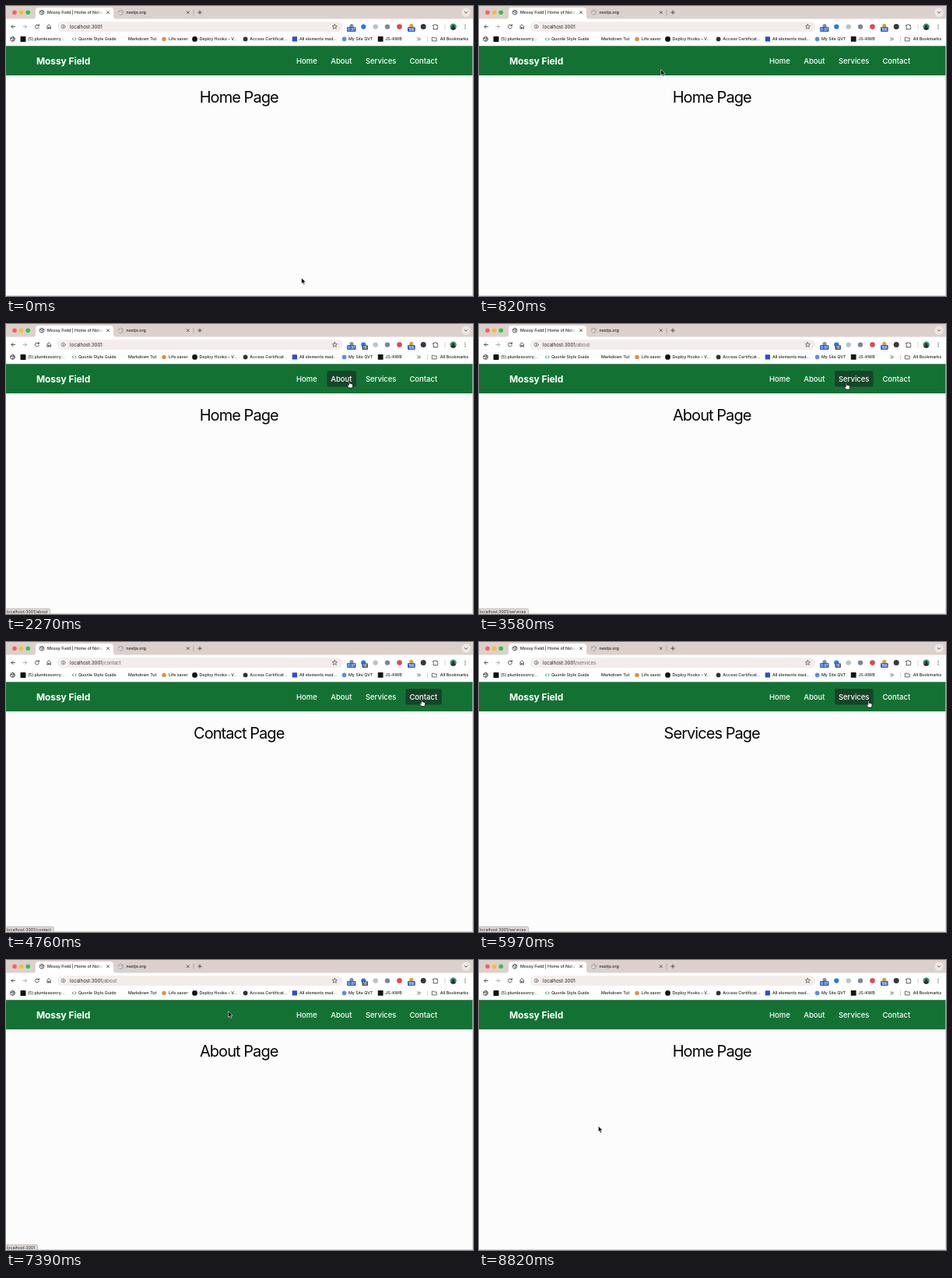
Write an HTML page that moves like this. It is 600 px wide and 372 px high and loops after 8.85 s.

```html
<!DOCTYPE html>
<html lang="en">
<head>
<meta charset="utf-8">
<title>Page navigation</title>
<style>
  html, body { margin: 0; width: 100%; height: 100%; overflow: hidden; background: #fcfcfc; }
  svg { display: block; width: 600px; height: 372px; font-family: Inter, "Open Sans", sans-serif; }
  text { white-space: pre; }
  .small { font-size: 5.3px; font-weight: 500; fill: #222; }
  .nav { font-size: 9.5px; font-weight: 500; fill: #fff; }
  .line { fill: none; stroke: #444; stroke-width: .9; stroke-linecap: round; stroke-linejoin: round; }
</style>
</head>
<body>
<svg viewBox="0 0 600 372">
  <defs>
    <g id="globe">
      <circle r="2.9" fill="#fff" stroke="currentColor" stroke-width=".8"/>
      <path d="M-2.6-1 0-.4 1 1-.5 2.6M.3-2.7 1 -1 2.7 0" fill="none" stroke="currentColor" stroke-width=".9"/>
    </g>
    <path id="close" class="line" d="M-1.5-1.5 1.5 1.5M1.5-1.5-1.5 1.5"/>
    <linearGradient id="fade">
      <stop offset="0" stop-color="#fff" stop-opacity="0"/>
      <stop offset="1" stop-color="#fff"/>
    </linearGradient>
    <clipPath id="titleClip"><path d="M50 2h74v12H50z"/></clipPath>
  </defs>

  <!-- tab strip -->
  <path fill="#dcd0cd" d="M0 0h600v17H0z"/>
  <circle cx="11" cy="8.2" r="2.8" fill="#fe5f57"/>
  <circle cx="19.6" cy="8.2" r="2.8" fill="#febc2e"/>
  <circle cx="28.2" cy="8.2" r="2.8" fill="#28c840"/>
  <path fill="#fff" d="M34 17q4 0 4-4V6q0-4 4-4h92q4 0 4 4v7q0 4 4 4z"/>
  <use href="#globe" x="46" y="8.2" color="#445"/>
  <text class="small" x="53" y="10.1" clip-path="url(#titleClip)">Mossy Field | Home of Nature</text>
  <path fill="url(#fade)" d="M115 3h10v11h-10z"/>
  <use href="#close" x="131" y="8.2"/>
  <use href="#globe" x="147.5" y="8.2" color="#888"/>
  <text class="small" x="154.5" y="10.1">nextjs.org</text>
  <use href="#close" x="233.7" y="8.2"/>
  <path stroke="#a89d9a" stroke-width=".8" d="M241 4.5v7.5"/>
  <path class="line" d="M246.7 8.2h4.6M249 5.9v4.6"/>
  <circle cx="591" cy="8.2" r="5.6" fill="#eee7e5"/>
  <path class="line" d="m589.3 7.5 1.7 1.7 1.7-1.7"/>

  <!-- toolbar -->
  <path fill="#fff" d="M0 16.5h600V51H0z"/>
  <path class="line" d="M11.5 26.5H7m2-2.1-2.1 2.1L9 28.6"/>
  <path class="line" style="stroke:#aaa" d="M22 26.5h4.5m-2-2.1 2.1 2.1-2.1 2.1"/>
  <path class="line" d="M42 25a2.5 2.5 0 1 0 .3 2.3M42.4 23.7v1.7h-1.7"/>
  <path class="line" d="M53 26v3.1h1.5v-1.8h1.4v1.8h1.5V26l-2.2-2z"/>
  <rect x="66" y="20.2" width="366.5" height="12.8" rx="6.4" fill="#f3eceb"/>
  <circle cx="73.5" cy="26.5" r="4.8" fill="#fff"/>
  <circle cx="73.5" cy="26.5" r="2.6" class="line" style="stroke-width:.7"/>
  <path class="line" d="M73.5 26.4v1.2m0-2.5v.1"/>
  <text x="82" y="28.7" font-size="6.1" fill="#222">localhost:3001<tspan id="path" fill="#666"></tspan></text>
  <path class="line" style="stroke-width:.7" d="m422.3 23.4.9 2 2.2.2-1.7 1.5.6 2.2-2-1.2-2 1.2.6-2.2-1.7-1.5 2.2-.2z"/>

  <!-- extensions -->
  <circle cx="444" cy="25.6" r="2.6" fill="#7c91a8"/>
  <rect x="438" y="27" width="11.5" height="6" rx="1.2" fill="#2458cf"/>
  <text x="443.8" y="31.7" font-size="4.4" font-weight="600" fill="#fff" text-anchor="middle">0.97</text>
  <circle cx="459.3" cy="26.6" r="3.1" fill="#2677ee"/>
  <g id="badge">
    <rect x="457.5" y="27.2" width="7.5" height="5.8" rx="1.2" fill="#435069"/>
    <text x="461.2" y="31.7" font-size="4.4" font-weight="600" fill="#fff" text-anchor="middle">10</text>
  </g>
  <circle cx="474.7" cy="26.6" r="3.2" fill="#b9c2cb"/>
  <circle cx="490" cy="26.6" r="3.2" fill="#78879a"/>
  <circle cx="505.5" cy="26.6" r="3.3" fill="#e4454f"/>
  <circle cx="520.8" cy="25.4" r="2.6" fill="#d5a33e"/>
  <rect x="516" y="27" width="9.7" height="6" rx="1.2" fill="#2458cf"/>
  <text x="520.8" y="31.7" font-size="4.4" font-weight="600" fill="#fff" text-anchor="middle">186</text>
  <circle cx="536.2" cy="26.6" r="3.5" fill="#3a3640"/>
  <path class="line" d="M549 24.6h1.7a1 1 0 0 1 2 0h1.7v1.8a1 1 0 0 1 0 1.8v1.6H549v-1.7a1 1 0 0 0 0-1.8z"/>
  <path stroke="#ddd1ce" d="M564 23v7"/>
  <circle cx="574.6" cy="26.6" r="4.2" fill="#2f9a6c"/>
  <path fill="#38282b" d="M571.5 29.5q.2-2.2 2-2.4a1.6 1.6 0 1 1 2.2 0q1.8.2 2 2.4-3.1 2.6-6.2 0z"/>
  <path stroke="#333" stroke-width="1.3" stroke-linecap="round" d="M590 24.3h0M590 26.6h0M590 28.9h0"/>

  <!-- bookmarks -->
  <use href="#globe" x="8.5" y="42.4" color="#222"/>
  <rect x="18.5" y="39" width="7" height="7" rx=".8" fill="#111"/>
  <path class="line" style="stroke:#1b8a4e" d="m86.8 41-1.7 1.4 1.7 1.4m1.8-2.8 1.7 1.4-1.7 1.4"/>
  <circle cx="203" cy="42.4" r="2.7" fill="#e98b42"/>
  <circle cx="242.5" cy="42.4" r="3.4" fill="#111"/>
  <circle cx="307.6" cy="42.4" r="2.9" fill="#333"/>
  <rect x="367.7" y="39.3" width="6.3" height="6.3" rx=".6" fill="#3049e0"/>
  <circle cx="434.6" cy="42.4" r="2.8" fill="#5a8de8"/>
  <rect x="477.8" y="39" width="6.8" height="6.8" rx=".6" fill="#151515"/>
  <g id="bookmarks"></g>
  <path class="line" d="m528.7 40.8 1.6 1.6-1.6 1.6m2.2-3.2 1.6 1.6-1.6 1.6"/>
  <path stroke="#ddd1ce" d="M541.5 39v7"/>
  <path class="line" style="stroke-width:.8" d="M547.7 40.2h1.9l.7.8h2.9v3.9h-5.5z"/>

  <!-- page -->
  <path fill="#fcfcfc" d="M0 51h600v321H0z"/>
  <path fill="#137233" d="M0 51.2h600V89H0z"/>
  <rect id="hover" y="60" height="20.4" rx="2.6" fill="#174428"/>
  <text x="39" y="75" font-size="12" font-weight="700" fill="#fff" letter-spacing="-.1">Mossy Field</text>
  <g id="links"></g>
  <text id="heading" x="299.2" y="124.2" font-size="20" letter-spacing="-.95" text-anchor="middle" fill="#050505"></text>
  <path fill="none" stroke="#c9c6c6" stroke-width=".8" d="M599.6 51v320.6H0"/>

  <g id="status">
    <rect id="statusBox" x="-4" y="365.2" height="11" rx="2" fill="#e3dad8" stroke="#aaa2a0" stroke-width=".7"/>
    <text id="statusText" class="small" x="1" y="371.3" style="font-weight:400"></text>
  </g>

  <path id="arrow" fill="#000" stroke="#fff" stroke-width=".6" d="M0 0v7.6l1.7-1.6 1.2 2.7 1.4-.6-1.2-2.6h2.4z"/>
  <path id="hand" fill="#fff" stroke="#000" stroke-width=".75" stroke-linejoin="round"
    d="M-.8.4Q0-.7.7.4V3q1-.6 1.4.2 1-.4 1.3.4 1-.2 1.1.8v1.8Q4.3 7.4 3.7 8.6H-.4Q-1.2 7.2-2.8 5.2q-.2-1.2.9-.8L-.8 5.4z"/>
</svg>
<script>
const LOOP = 8850, LINGER = 450;
const $ = id => document.getElementById(id);

const links = [
  { name: "Home", x: 368, w: 37.5, path: "" },
  { name: "About", x: 412.3, w: 37.8, path: "/about" },
  { name: "Services", x: 457, w: 49.6, path: "/services" },
  { name: "Contact", x: 513.5, w: 46.5, path: "/contact" },
  { name: "Logo", x: 39, w: 75, path: "" }
];
// [time, index of the page shown from then on]
const visits = [[0, 0], [2560, 1], [3760, 2], [4720, 3], [5740, 2], [6700, 1], [8040, 0]];
// cursor hot spot: [time, x, y]
const moves = [
  [0, 379.8, 349], [820, 234, 81.5], [1120, 108, 71], [1480, 100, 72], [1880, 372, 70],
  [2270, 441, 73.5], [2760, 441, 73.5], [3200, 472, 75.5], [3900, 472, 75.5],
  [4400, 534, 74], [4980, 534, 74], [5450, 500.5, 75.5], [5990, 500.5, 75.5],
  [6400, 432, 73], [6900, 430, 73], [7390, 286, 65.8], [7800, 98, 72], [8160, 96, 73],
  [8820, 153.3, 213]
];

function addText(parent, cls, x, y, str) {
  const el = document.createElementNS("http://www.w3.org/2000/svg", "text");
  el.setAttribute("class", cls);
  el.setAttribute("x", x);
  el.setAttribute("y", y);
  el.textContent = str;
  $(parent).append(el);
}
[[28, "(5) plumlessonry..."], [93, "Quonle Style Guide"], [157, "Markdown Tut"], [209, "Life saver"],
 [248.5, "Deploy Hooks – V..."], [313.3, "Access Certificat..."], [377, "All elements mad..."],
 [440, "My Site QVT"], [487.3, "JS-KWB"], [557.8, "All Bookmarks"]
].forEach(([x, str]) => addText("bookmarks", "small", x, 44.3, str));
links.slice(0, 4).forEach(l => addText("links", "nav", l.x + 4.9, 74, l.name));

// Monotone cubic through the cursor points.
const slope = (i, k) => (moves[i + 1][k] - moves[i][k]) / (moves[i + 1][0] - moves[i][0]);
function tangent(i, k) {
  if (i === 0) return slope(0, k);
  if (i === moves.length - 1) return 0;
  const a = slope(i - 1, k), b = slope(i, k);
  return a * b > 0 ? 2 * a * b / (a + b) : 0;
}
function cursorAt(t) {
  let i = 0;
  while (i < moves.length - 2 && moves[i + 1][0] <= t) i++;
  const [p, q] = [moves[i], moves[i + 1]], d = q[0] - p[0];
  const u = Math.min(1, (t - p[0]) / d), v = 1 - u;
  return [1, 2].map(k =>
    p[k] * v * v * (1 + 2 * u) + q[k] * u * u * (3 - 2 * u) +
    d * u * v * (tangent(i, k) * v - tangent(i + 1, k) * u));
}
function linkAt(t) {
  const [x, y] = cursorAt(t);
  return links.find(l => x >= l.x && x <= l.x + l.w && y >= 60 && y <= 80.4);
}
// The status bubble stays for a moment after the cursor leaves a link.
function recentLink(t) {
  for (let s = t; s >= Math.max(0, t - LINGER); s -= 15) {
    const link = linkAt(s);
    if (link) return link;
  }
}
const show = (id, on) => $(id).setAttribute("visibility", on ? "visible" : "hidden");

function draw(t) {
  const page = links[visits.filter(v => v[0] <= t).pop()[1]];
  $("path").textContent = page.path;
  $("heading").textContent = page.name + " Page";

  const link = linkAt(t), button = link && link.name !== "Logo";
  show("hover", button);
  if (button) {
    $("hover").setAttribute("x", link.x);
    $("hover").setAttribute("width", link.w);
  }

  const recent = recentLink(t);
  show("status", recent);
  if (recent) {
    $("statusText").textContent = "localhost:3001" + recent.path;
    $("statusBox").setAttribute("width", $("statusText").getComputedTextLength() + 8.3);
  }
  show("badge", t > 1500 && t < 8100);

  const [x, y] = cursorAt(t);
  for (const id of ["arrow", "hand"]) $(id).setAttribute("transform", `translate(${x} ${y})`);
  show("arrow", !link);
  show("hand", link);
}
const start = performance.now();
function tick() {
  draw((performance.now() - start) % LOOP);
  requestAnimationFrame(tick);
}
tick();
</script>
</body>
</html>
```
